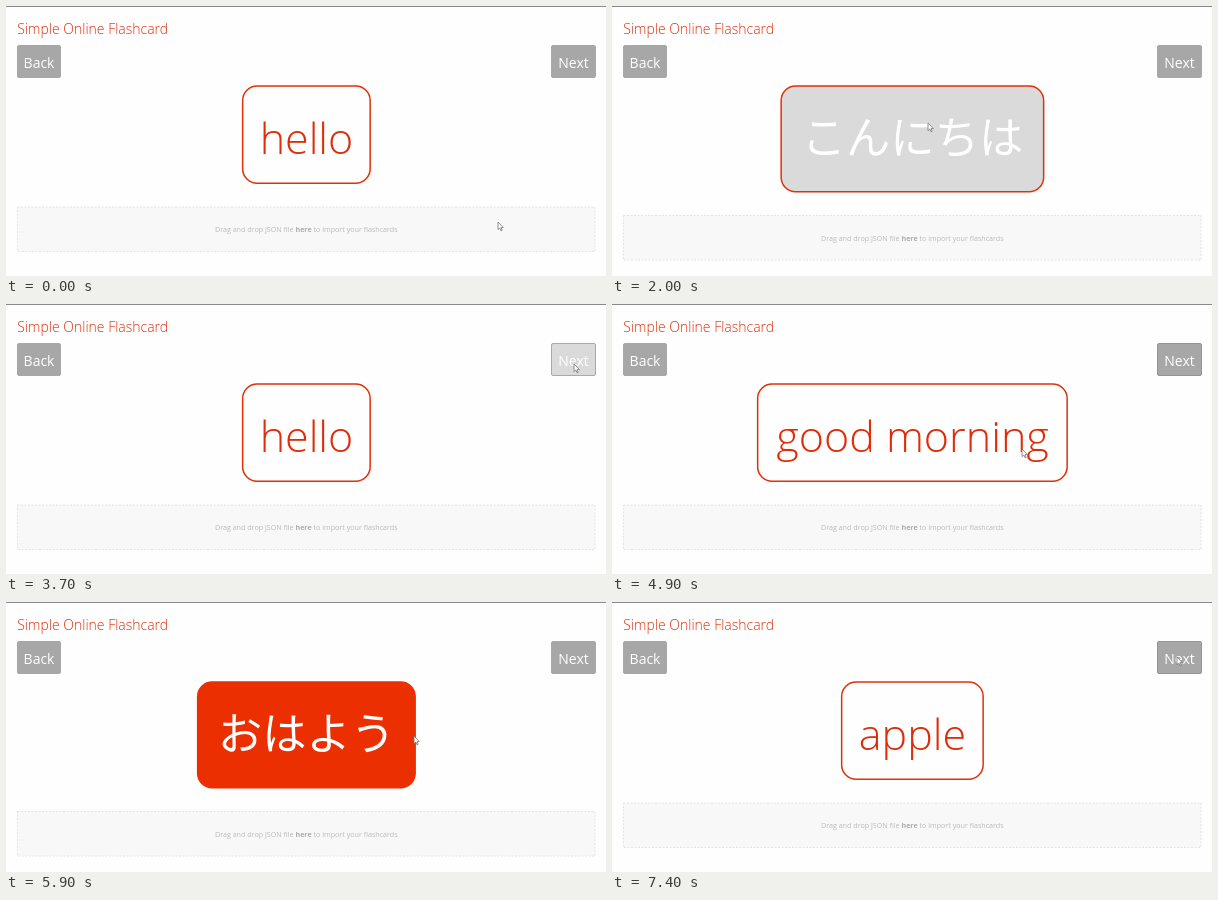
Animation of 600 by 270 pixels, one loop 7.5 s. Source, as an HTML page:

```html
<!DOCTYPE html>
<html lang="ja">
<head>
<meta charset="utf-8">
<title>Simple Online Flashcard</title>
<style>
  html, body { margin: 0; width: 100%; height: 100%; overflow: hidden; background: #fefefe; }
  svg { display: block; font-family: "Open Sans", "Noto Sans CJK JP", "Noto Sans CJK", sans-serif; }
  .title { font-size: 14px; font-weight: 300; fill: #e02c08; }
  .button rect { fill: #a7a7a7; stroke: #a7a7a7; }
  .button text { font-size: 14px; fill: #fff; text-anchor: middle; }
  .button.focused rect { stroke: #949494; }
  .button.pressed rect { fill: #dadada; stroke: #a8a8a8; }
  #card rect { fill: #fefefe; stroke: #e23008; stroke-width: 1.5px; }
  #card text { font-size: 43px; font-weight: 300; fill: #e02c08; text-anchor: middle; }
  #card .kana { font-size: 44.3px; font-weight: 400; }
  #card.flipped rect { fill: #ec2f00; stroke: #ec2f00; }
  #card.pressed rect { fill: #dadada; }
  #card.flipped text, #card.pressed text { fill: #fff; }
  #drop rect { fill: #f8f8f8; stroke: #e4e4e4; stroke-dasharray: 2 1.5; }
  #drop text { font-size: 7.15px; fill: #bababa; text-anchor: middle; }
  #drop tspan { font-weight: 700; fill: #adadad; }
</style>
</head>
<body>
<svg width="600" height="270" viewBox="0 0 600 270">
  <rect width="600" height="1" fill="#8a8a8a"/>
  <text class="title" x="11.3" y="28">Simple Online Flashcard</text>
  <g class="button">
    <rect x="11.5" y="39.5" width="43" height="32" rx="1.5"/>
    <text x="33" y="62">Back</text>
  </g>
  <g class="button" id="next">
    <rect x="545.5" y="39.5" width="44" height="32" rx="1.5"/>
    <text x="567.5" y="62">Next</text>
  </g>
  <g id="card">
    <rect y="80" rx="14.5"/>
    <text x="300.5" y="148"></text>
  </g>
  <g id="drop">
    <rect x="11.5" y="201" width="577.5" height="44.5"/>
    <text x="300.3" y="226">Drag and drop JSON file <tspan>here</tspan> to import your flashcards</text>
  </g>
  <path id="cursor" d="M0 0V7.6L1.8 6L3 8.8L4.2 8.3L3 5.6H5.3Z" fill="#fff" stroke="#777" stroke-width=".8"/>
</svg>
<script>
const LOOP = 7500, STEP = 100;

// Outer card widths
const widths = { "hello": 129, "good morning": 311, "apple": 143, "こんにちは": 264, "おはよう": 219 };

// [start ms, text, look]
const cardStates = [
  [0, "hello", ""], [1100, "hello", "pressed"],
  [1200, "こんにちは", "flipped"], [1900, "こんにちは", "pressed"],
  [2100, "hello", ""], [3800, "good morning", ""], [5200, "good morning", "pressed"],
  [5300, "おはよう", "flipped"], [6000, "おはよう", "pressed"],
  [6200, "good morning", ""], [7200, "apple", ""]
];

// [start ms, look]
const nextStates = [
  [0, ""], [3600, "pressed"], [3800, "focused"], [5200, ""], [7000, "pressed"], [7200, "focused"]
];

// [ms, x, y] of the pointer tip
const pointer = [
  [0, 492, 216], [100, 492, 216], [1000, 316, 117], [2600, 316, 117], [3400, 568, 60],
  [4200, 568, 60], [4900, 410, 145], [5200, 408, 134], [6100, 408, 134],
  [6500, 500, 110], [6800, 565, 55], [LOOP, 565, 55]
];

const [next, card, drop, cursor] =
  ["next", "card", "drop", "cursor"].map(id => document.getElementById(id));
const [cardBox, cardText] = card.children;

const current = (states, t) => states.findLast(s => s[0] <= t);
const move = (el, x, y) => el.setAttribute("transform", `translate(${x} ${y})`);

function pointerAt(t) {
  const i = pointer.findIndex(p => p[0] > t);
  const [t0, x0, y0] = pointer[i - 1], [t1, x1, y1] = pointer[i];
  const u = (t - t0) / (t1 - t0), k = u * u * (3 - 2 * u);
  return [x0 + (x1 - x0) * k, y0 + (y1 - y0) * k];
}

function draw(now) {
  const t = Math.floor(now % LOOP / STEP) * STEP;
  const [, text, look] = current(cardStates, t);
  const kana = text.charCodeAt(0) > 0x3000;
  const width = widths[text] - 1.5;

  card.setAttribute("class", look);
  cardBox.setAttribute("x", 300.4 - width / 2);
  cardBox.setAttribute("width", width);
  cardBox.setAttribute("height", kana ? 105.7 : 97.3);
  cardText.textContent = text;
  cardText.setAttribute("class", kana ? "kana" : "");
  next.setAttribute("class", "button " + current(nextStates, t)[1]);
  move(drop, 0, kana ? 8.5 : 0);
  move(cursor, ...pointerAt(t));
  requestAnimationFrame(draw);
}
draw(performance.now());
</script>
</body>
</html>
```
